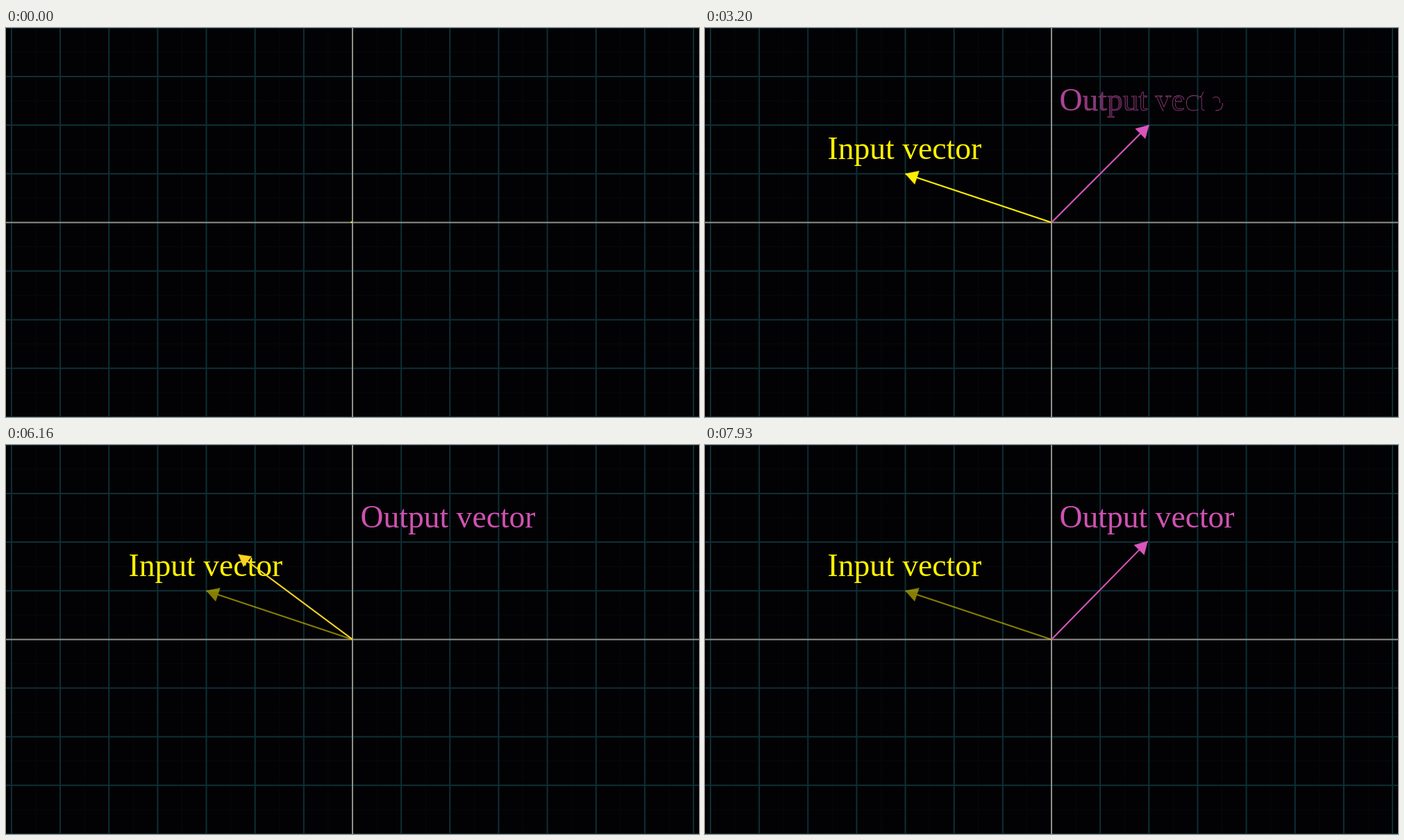
Animation of 998x561 px, one loop 8000 ms. Source, as an HTML page:

```html
<!DOCTYPE html>
<html lang="en">
<head>
<meta charset="utf-8">
<title>Input and output vector</title>
<style>
html, body { margin: 0; width: 100%; height: 100%; overflow: hidden; background: #020204; }
svg { display: block; width: 998px; height: 561px; }
text { font: 45.6px "Liberation Serif", "Times New Roman", serif; }
</style>
</head>
<body>
<svg id="stage" viewBox="0 0 998 561"></svg>
<script>
const LOOP = 8000, UNIT = 70.15, CX = 499, CY = 280.4;
const YELLOW = [255, 238, 0], PINK = [218, 84, 188];

// Start and length of each step in ms
const STEPS = {
  drawInput: [-50, 840], writeInput: [790, 815],
  drawOutput: [1610, 845], writeOutput: [2455, 1630],
  turn: [5115, 3000], fade: [5115, 1000]
};

const stage = document.getElementById("stage");
const add = (tag, attrs, parent = stage) => {
  const node = document.createElementNS("http://www.w3.org/2000/svg", tag);
  set(node, attrs);
  return parent.appendChild(node);
};
function set(node, attrs) {
  for (const key in attrs) node.setAttribute(key, attrs[key]);
}

const clamp = x => Math.min(1, Math.max(0, x));
const lerp = (a, b, p) => a + (b - a) * p;
const mix = (p, q, s) => p.map((v, i) => lerp(v, q[i], s));
const rgb = c => `rgb(${c.map(Math.round)})`;
const sigmoid = x => 1 / (1 + Math.exp(-x));
const smooth = u => clamp((sigmoid(10 * (u - 0.5)) - sigmoid(-5)) / (1 - 2 * sigmoid(-5)));
const progress = (step, t) => clamp((t - STEPS[step][0]) / STEPS[step][1]);
const toPath = points => "M" + points.map(p => p.map(v => v.toFixed(2)).join()).join("L");

function drawGrid() {
  const line = (k, stroke, width) => {
    const x = CX + k * UNIT, y = CY + k * UNIT;
    add("path", { d: `M${x} 0V561M0 ${y}H998`, stroke, "stroke-width": width });
  };
  for (let k = -7.5; k < 8; k++) line(k, "#07090b", 1);
  for (let k = -7; k <= 7; k++) if (k) line(k, "#0e2f37", 2);
  line(0, "#90908c", 2);
}

// Triangle of an arrow from the origin: apex, right corner, left corner
function tipPoints(x, y) {
  const apex = [CX + x * UNIT, CY - y * UNIT], n = Math.hypot(x, y);
  const dx = x / n, dy = -y / n, len = 17.5, half = 10.1;
  const corner = s => [apex[0] - dx * len - dy * half * s, apex[1] - dy * len + dx * half * s];
  return [apex, corner(1), corner(-1)];
}

// Quarter turn, clockwise on screen, that carries p to q
function arc(p, q, s) {
  const dx = q[0] - p[0], dy = q[1] - p[1];
  const cx = (p[0] + q[0] - dy) / 2, cy = (p[1] + q[1] + dx) / 2;
  const a = s * Math.PI / 2, x = p[0] - cx, y = p[1] - cy;
  return [cx + x * Math.cos(a) - y * Math.sin(a), cy + x * Math.sin(a) + y * Math.cos(a)];
}

function makeArrow() {
  const group = add("g", {});
  return {
    group,
    shaft: add("path", { fill: "none", "stroke-width": 2.1 }, group),
    tip: add("path", { "stroke-width": 0.5 }, group)
  };
}

// The shaft is traced in the first half, the tip outline in the second
function showArrow(arrow, points, color, amount = 1) {
  const origin = [CX, CY], paint = rgb(color);
  const end = mix(origin, points[0], clamp(amount * 2));
  set(arrow.shaft, { d: toPath([origin, end]), stroke: paint });
  const edges = clamp(amount * 2 - 1) * 3, whole = Math.min(2, Math.floor(edges));
  const traced = points.slice(0, whole + 1);
  traced.push(mix(points[whole], points[(whole + 1) % 3], edges - whole));
  set(arrow.tip, { d: edges > 0 ? toPath(traced) : "", fill: paint, stroke: paint });
}

function makeLabel(string, x, y, color) {
  const text = add("text", { x, y, fill: color, stroke: color });
  return string.match(/\S\s?/g).map(chars => {
    const span = add("tspan", {}, text);
    span.textContent = chars;
    return { span, outline: /[npu]/.test(chars) ? 165 : 105 };
  });
}

// Each letter gets its outline first, then its fill
function writeLabel(letters, p) {
  letters.forEach(({ span, outline }, i) => {
    const a = clamp(2 * p - i / letters.length);
    const fill = clamp(2 * a - 1);
    set(span, {
      "fill-opacity": fill,
      "stroke-opacity": a > 0 ? 0.75 : 0,
      "stroke-width": 0.8 * (1 - fill),
      "stroke-dasharray": a < 0.5 ? `${2 * a * outline} 999` : "none"
    });
  });
}

drawGrid();
const inputTip = tipPoints(-3, 1), outputTip = tipPoints(2, 2);
const input = makeArrow();
const inputLabel = makeLabel("Input vector", 176.5, 189, "#fff200");
const output = makeArrow();
const outputLabel = makeLabel("Output vector", 510.5, 119, "#cf52b1");
const mover = makeArrow();

function render(t) {
  showArrow(input, inputTip, YELLOW, smooth(progress("drawInput", t)));
  set(input.group, { opacity: 1 - 0.48 * smooth(progress("fade", t)) });
  writeLabel(inputLabel, progress("writeInput", t));

  const turning = t >= STEPS.turn[0];
  showArrow(output, outputTip, PINK, smooth(progress("drawOutput", t)));
  set(output.group, { visibility: turning ? "hidden" : "visible" });
  writeLabel(outputLabel, progress("writeOutput", t));

  const s = smooth(progress("turn", t));
  showArrow(mover, inputTip.map((p, i) => arc(p, outputTip[i], s)), mix(YELLOW, PINK, s));
  set(mover.group, { visibility: turning ? "visible" : "hidden" });
}

const begin = performance.now();
function tick() {
  render((performance.now() - begin) % LOOP);
  requestAnimationFrame(tick);
}
tick();
</script>
</body>
</html>
```
